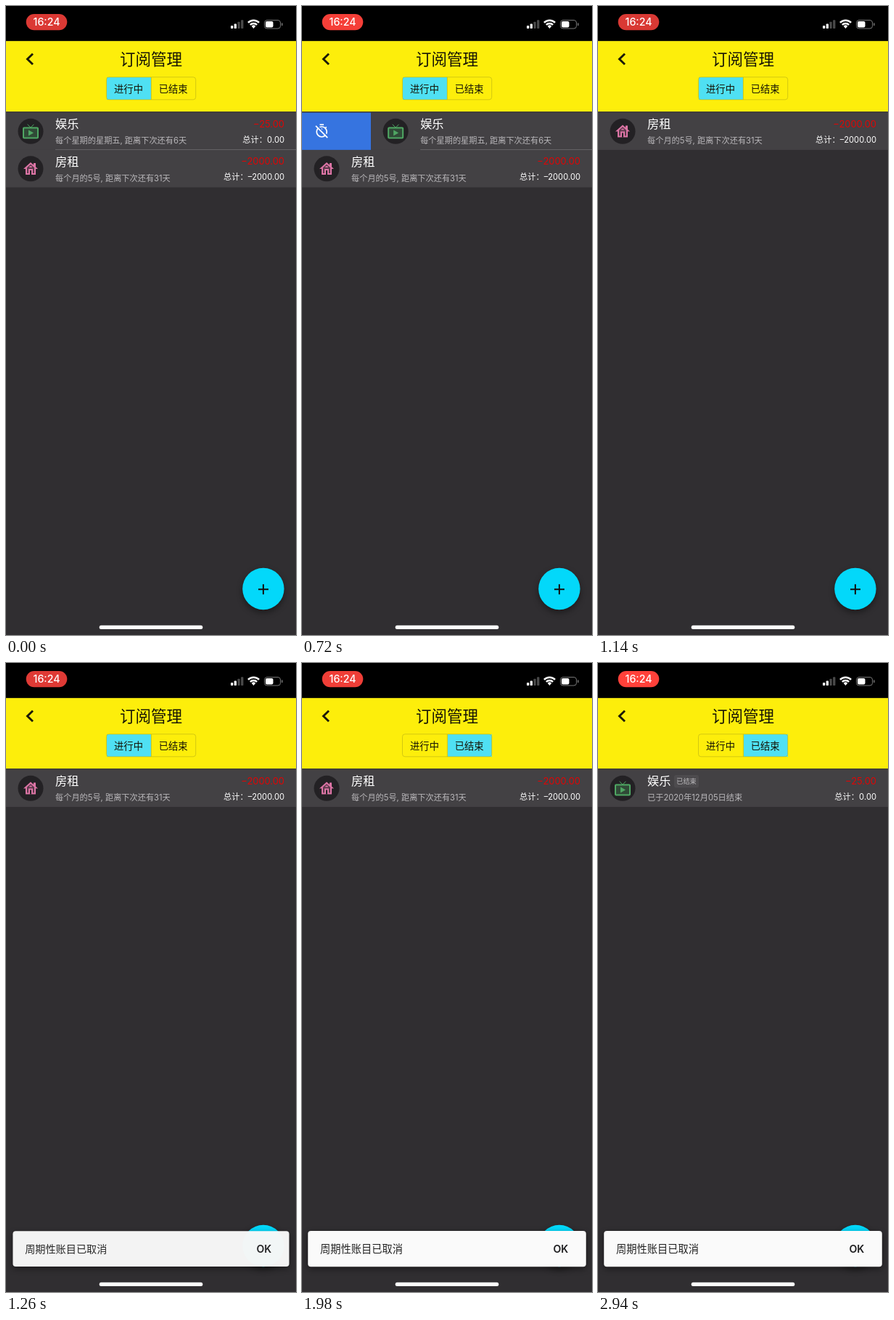
These frames come from a looping animation (400x865 px, 3000 ms). An HTML page with a canvas:

```html
<!DOCTYPE html>
<html lang="zh-CN">
<head>
<meta charset="utf-8">
<title>订阅管理</title>
<style>
  html, body { margin: 0; width: 100%; height: 100%; overflow: hidden; background: #302e31; }
  canvas { display: block; width: 400px; height: 865px; }
</style>
</head>
<body>
<canvas id="stage"></canvas>
<script>
const W = 400, H = 865, LOOP = 3000, STEP = 60;
const ROW_TOP = 146.4, ROW_H = 51.5;
const FONT = 'Inter, "Noto Sans CJK SC", "Noto Sans CJK", sans-serif';

const canvas = document.getElementById('stage');
const c = canvas.getContext('2d');
const dpr = window.devicePixelRatio || 1;
canvas.width = W * dpr;
canvas.height = H * dpr;

const clamp = v => Math.max(0, Math.min(1, v));
const easeOut = (p, n) => 1 - Math.pow(1 - clamp(p), n);

function text(s, x, y, size, color, align = 'left', weight = 400) {
  c.font = `${weight} ${size}px ${FONT}`;
  c.textAlign = align;
  c.fillStyle = color;
  c.fillText(s, x, y);
}

function rect(x, y, w, h, color) {
  c.fillStyle = color;
  c.fillRect(x, y, w, h);
}

function round(x, y, w, h, r, color) {
  c.beginPath();
  c.roundRect(x, y, w, h, r);
  c.fillStyle = color;
  c.fill();
}

function disc(x, y, r, color) {
  c.beginPath();
  c.arc(x, y, r, 0, Math.PI * 2);
  c.fillStyle = color;
  c.fill();
}

// points: flat list x, y, x, y ...
function trace(points) {
  c.beginPath();
  for (let i = 0; i < points.length; i += 2) c.lineTo(points[i], points[i + 1]);
}

function line(points, color, width) {
  trace(points);
  c.strokeStyle = color;
  c.lineWidth = width;
  c.stroke();
}

function poly(points, color) {
  trace(points);
  c.closePath();
  c.fillStyle = color;
  c.fill();
}

function shadow(color, blur, y) {
  c.shadowColor = color;
  c.shadowBlur = blur * dpr;
  c.shadowOffsetY = y * dpr;
}

function statusBar(t) {
  rect(0, 0, W, 48.2, '#000');
  const glow = 0.5 - 0.5 * Math.cos((t - 1110) / 1200 * Math.PI * 2);
  const mix = (a, b) => Math.round(a + (b - a) * glow);
  round(27.7, 11, 56.6, 22.2, 11.1, `rgb(${mix(217, 255)},${mix(57, 65)},${mix(52, 58)})`);
  text('16:24', 56, 27, 14.2, '#fff', 'center', 500);

  for (let i = 0; i < 4; i++) {
    const h = 4 + i * 2.6;
    round(310 + i * 4.7, 31 - h, 3.3, h, 0.8, i < 2 ? '#fff' : '#4a4a4a');
  }

  c.strokeStyle = '#fff';
  c.lineWidth = 2.5;
  for (const r of [6.6, 10.7]) {
    c.beginPath();
    c.arc(341.5, 30.5, r, -Math.PI * 0.75, -Math.PI * 0.25);
    c.stroke();
  }
  c.beginPath();
  c.moveTo(341.5, 31);
  c.arc(341.5, 30.5, 3.9, -Math.PI * 0.75, -Math.PI * 0.25);
  c.fillStyle = '#fff';
  c.fill();

  c.beginPath();
  c.roundRect(356.5, 19.5, 22, 11.5, 3.5);
  c.strokeStyle = '#777';
  c.lineWidth = 1;
  c.stroke();
  round(358, 21, 10.5, 8.5, 2, '#fff');
  round(380, 23.3, 1.5, 4, 0.8, '#777');
}

function header(ended) {
  const border = 'rgba(190,180,20,.65)';
  rect(0, 48.2, W, 97.2, '#fdee0b');
  rect(0, 145.4, W, 1, '#39373a');
  line([37, 65.8, 29.5, 73, 37, 80.2], '#1c1a08', 2.9);
  text('订阅管理', 200, 81, 21.5, '#151305', 'center');

  rect(ended ? 201 : 139, 98, 61, 31, '#4fe0f3');
  c.beginPath();
  c.roundRect(138.5, 97.8, 123.2, 31, 3.5);
  c.strokeStyle = border;
  c.lineWidth = 1;
  c.stroke();
  line([200.4, 98, 200.4, 128.8], border, 1);
  text('进行中', 169, 118.5, 13.3, '#151305', 'center');
  text('已结束', 230.7, 118.5, 13.3, '#151305', 'center');
}

// both icons are drawn on a 24 x 24 grid
function tvIcon() {
  const green = '#4fa763';
  c.beginPath();
  c.roundRect(2, 7, 20, 14, 1);
  c.fillStyle = '#304a37';
  c.fill();
  c.strokeStyle = green;
  c.lineWidth = 2;
  c.stroke();
  line([7.6, 2.3, 12, 6.7, 16.4, 2.3], green, 1);
  poly([9, 10, 16, 14, 9, 18], green);
}

function houseIcon() {
  const pink = '#dc74a5', shade = '#5b3a4b';
  poly([12, 3, 16, 6.6, 16, 4, 19, 4, 19, 9.3, 22, 12, 19, 12, 19, 20, 5, 20, 5, 12, 2, 12], pink);
  poly([12, 5.7, 17, 10.2, 17, 18, 15, 18, 15, 12, 9, 12, 9, 18, 7, 18, 7, 10.2], shade);
  rect(11, 14, 2, 6, '#232124');
  c.beginPath();
  c.arc(12, 10, 2, Math.PI, 0);
  c.fillStyle = pink;
  c.fill();
}

const fun = {
  name: '娱乐', note: '每个星期的星期五, 距离下次还有6天',
  amount: '−25.00', total: '总计：0.00', icon: tvIcon
};
const rent = {
  name: '房租', note: '每个月的5号, 距离下次还有31天',
  amount: '−2000.00', total: '总计：–2000.00', icon: houseIcon
};
const doneFun = { ...fun, note: '已于2020年12月05日结束', badge: '已结束' };

function row(item, index, dx = 0, divider = false) {
  c.save();
  c.translate(dx, index * ROW_H);
  rect(0, ROW_TOP, W, ROW_H, '#434144');
  if (divider) rect(68, 197, W - 68, 1, '#646265');
  disc(34, 172.3, 17.5, '#232124');
  c.save();
  c.translate(22, 160.5);
  item.icon();
  c.restore();
  text(item.name, 68, 168.2, 16.2, '#fff');
  text(item.note, 68, 189.4, 11.2, '#b9b7ba');
  text(item.amount, 384, 166.9, 12.9, '#e00505', 'right');
  text(item.total, 384, 187.7, 11.2, '#fff', 'right');
  if (item.badge) {
    round(105, 154, 34, 17.5, 3, '#4d4b4e');
    text(item.badge, 122, 166, 9.2, '#bdbbbe', 'center');
  }
  c.restore();
}

// blue swipe action with a crossed-out stopwatch
function action(width) {
  rect(0, ROW_TOP, width, ROW_H, '#3674e0');
  c.beginPath();
  c.arc(27.2, 173, 7, 0, Math.PI * 2);
  c.strokeStyle = '#fff';
  c.lineWidth = 1.7;
  c.stroke();
  line([24.5, 163.2, 30, 163.2], '#fff', 1.7);
  line([32, 168, 33.7, 166.3], '#fff', 1.7);
  line([27.2, 168.4, 27.2, 171.5], '#fff', 1.7);
  line([20.3, 163.9, 36.4, 180], '#3674e0', 1.8);
  line([19, 164.9, 35.2, 181.1], '#fff', 1.7);
}

function addButton() {
  c.save();
  shadow('rgba(0,0,0,.42)', 8, 4);
  disc(354.9, 801.5, 28.7, '#03d8fa');
  c.restore();
  line([348, 802.2, 362, 802.2], '#111', 2);
  line([354.9, 795.2, 354.9, 809.2], '#111', 2);
}

function snackbar(p) {
  const e = easeOut(p, 2.4);
  if (e <= 0) return;
  const s = 0.8 + 0.2 * e;
  c.save();
  c.globalAlpha = e;
  c.translate(200, 805.5);
  c.scale(s, s);
  c.translate(-200, -805.5);
  c.save();
  shadow('rgba(0,0,0,.45)', 8, 3);
  round(8.2, 781, 383.6, 49.2, 4, '#fafafa');
  c.restore();
  text('周期性账目已取消', 25, 811, 14.25, '#222');
  text('OK', 367.3, 811, 14.2, '#1c1c1e', 'right', 600);
  c.restore();
}

// drag the row open, hold, then let it spring shut
function swipe(t) {
  const open = 118.6 * easeOut((t - 420) / 540, 2);
  return open * (1 - easeOut((t - 1020) / 110, 2));
}

function draw(t) {
  c.setTransform(dpr, 0, 0, dpr, 0, 0);
  rect(0, 0, W, H, '#302e31');

  if (t >= 2280) {
    row(doneFun, 0);
  } else if (t >= 1140) {
    row(rent, 0);
  } else {
    const dx = swipe(t);
    row(rent, 1);
    if (dx > 0) action(dx);
    row(fun, 0, dx, true);
  }

  statusBar(t);
  header(t >= 1860);
  addButton();
  snackbar((t - 1146) / 150);
  round(128.7, 851.8, 142.6, 5.1, 2.5, '#fff');
}

const start = performance.now();
function frame() {
  const t = (performance.now() - start) % LOOP;
  draw(Math.floor(t / STEP) * STEP);
  requestAnimationFrame(frame);
}
frame();
</script>
</body>
</html>
```
